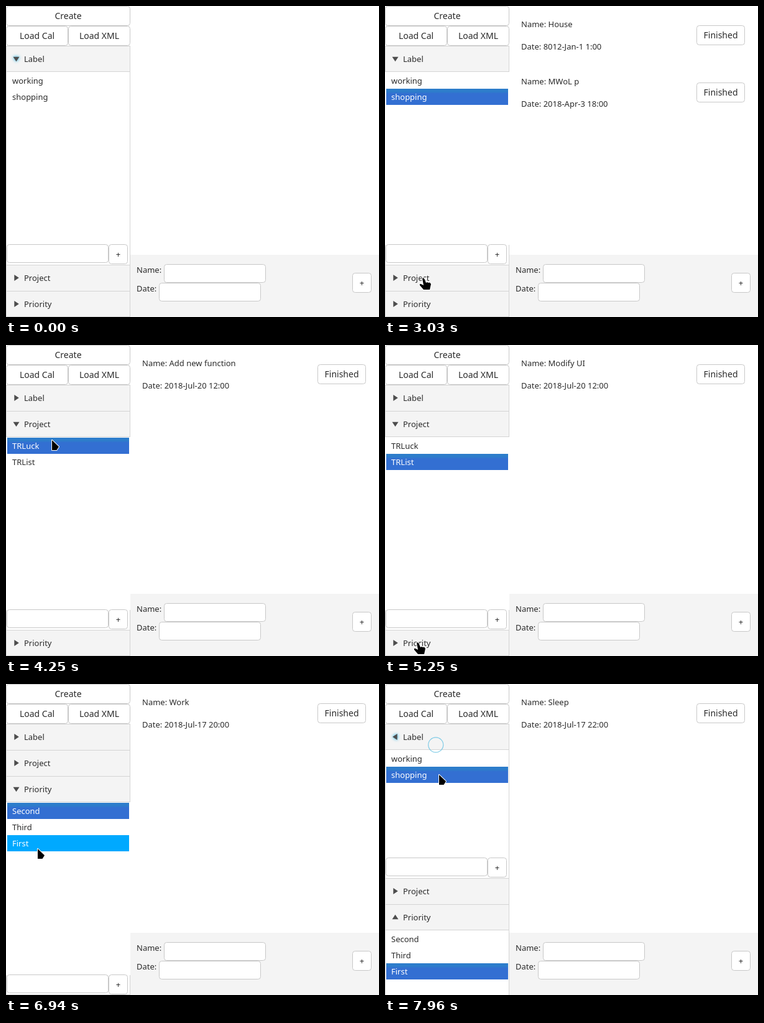
Write an HTML page with a canvas that moves like this. It is 600 px wide and 500 px high and loops after 8000 ms.

```html
<!DOCTYPE html>
<html lang="en">
<head>
<meta charset="utf-8">
<title>Task list</title>
<style>
html, body { margin: 0; width: 100%; height: 100%; overflow: hidden; background: #fff; }
canvas { display: block; }
</style>
</head>
<body>
<canvas id="stage" width="600" height="500"></canvas>
<script>
const ctx = document.getElementById('stage').getContext('2d', { alpha: false });
const LOOP = 8000, SLIDE = 350, MOVE = 350, POINTER_FROM = 2710;
const BODY = 310, HEAD = 42, ROW = 26, TOP = 64;
const INK = '#2b2b2b', LINE = '#c8c8c8', EDGE = '#d4d4d4', PANEL = '#f4f4f4';

const task = (name, date) => ({ name, date });
const row = (name, ...tasks) => ({ name, tasks });
const panes = [
  { title: 'Label', rows: [
    row('working', task('TRLuck', '2018-Jun-20 12:00')),
    row('shopping', task('House', '8012-Jan-1 1:00'), task('MWoL p', '2018-Apr-3 18:00'))] },
  { title: 'Project', rows: [
    row('TRLuck', task('Add new function', '2018-Jul-20 12:00')),
    row('TRList', task('Modify UI', '2018-Jul-20 12:00'))] },
  { title: 'Priority', rows: [
    row('Second', task('Work', '2018-Jul-17 20:00')),
    row('Third'),
    row('First', task('Sleep', '2018-Jul-17 22:00'))] }
];

// The session: the pointer arrives at a point, and a name is clicked
const stops = [{ t: 0, x: 70, y: 250 }], clicks = [];
const go = (t, x, y) => stops.push({ t, x, y });
function click(t, name) {
  const pane = panes.find(p => p.title === name || p.rows.some(r => r.name === name));
  clicks.push({ t, pane, row: pane.rows.find(r => r.name === name) });
}

go(1230, 70, 146);
go(1460, 70, 120);  click(1640, 'working');
go(1840, 70, 146);  click(2190, 'shopping');
go(3030, 59, 437);  click(3360, 'Project');
go(3860, 72, 162);  click(4010, 'TRLuck');
go(4250, 73, 152);
go(4540, 80, 186);  click(4560, 'TRList');
go(5200, 50, 478);  click(5430, 'Priority');
go(5780, 79, 270);
go(6040, 62, 230);  click(6090, 'Third');
go(6400, 50, 204);  click(6440, 'Second');
go(6900, 50, 264);  click(7130, 'First');
go(7620, 80, 79);   click(7740, 'Label');
go(7960, 86, 145);

const arrowShape = new Path2D('M1 1V17H8.5L12 11.5Z');
const handShape = new Path2D('M1 1Q3-1 4.5 2L7 8L9 7L11 8L13 7.5L15 10L13 19H3L-3 12Q-4 9-1 10L3 12Z');

function pointerAt(t) {
  const i = stops.findIndex(s => s.t > t);
  if (i < 0) return stops.at(-1);
  const a = stops[i - 1], b = stops[i];
  const u = Math.max(0, 1 - (b.t - t) / Math.min(MOVE, b.t - a.t));
  const k = u * u * (3 - 2 * u);
  return { x: a.x + (b.x - a.x) * k, y: a.y + (b.y - a.y) * k };
}

// Slow start and end with a straight middle part
function easeBoth(u) {
  if (u >= 1) return 1;
  if (u < .2) return 3.125 * u * u;
  return u < .8 ? 1.25 * u - .125 : 1 - 3.125 * (1 - u) ** 2;
}

function rect(x, y, w, h, fill) {
  ctx.fillStyle = fill;
  ctx.fillRect(x, y, w, h);
}

function text(s, x, y, size = 13, color = INK, align = 'left') {
  ctx.font = size + 'px "Noto Sans", sans-serif';
  ctx.textAlign = align;
  ctx.fillStyle = color;
  ctx.fillText(s, x, y);
}

function box(x, y, w, h) {
  ctx.beginPath();
  ctx.roundRect(x + .5, y + .5, w - 1, h - 1, 4);
  ctx.fillStyle = '#fff';
  ctx.fill();
  ctx.strokeStyle = LINE;
  ctx.lineWidth = 1;
  ctx.stroke();
}

function button(label, x, y, w, h, size = 14) {
  box(x, y, w, h);
  text(label, x + w / 2, y + h / 2 + 5, size, INK, 'center');
}

function sides(y, h) {
  rect(0, y, 1, h, EDGE);
  rect(199, y, 1, h, EDGE);
}

function drawArrow(x, y, angle, glow) {
  ctx.save();
  ctx.translate(x, y);
  ctx.rotate(angle * Math.PI / 180);
  ctx.beginPath();
  ctx.moveTo(-5, -3.2);
  ctx.lineTo(5, -3.2);
  ctx.lineTo(0, 4.3);
  ctx.closePath();
  ctx.fillStyle = '#4d4d4d';
  if (glow) {
    ctx.shadowColor = '#00a8e0';
    ctx.shadowBlur = 5;
  }
  ctx.fill();
  ctx.restore();
}

function drawRow(name, y, selected, hover) {
  if (selected) {
    const g = ctx.createLinearGradient(0, y, 0, y + 8);
    g.addColorStop(.6, '#2d7dcb');
    g.addColorStop(1, '#336fd2');
    rect(2, y, 196, ROW, g);
  } else if (hover) rect(2, y, 196, ROW, '#00a9ff');
  text(name, 10, y + 18, 13, selected || hover ? '#fff' : INK);
}

function drawBody(pane, y, shown, height, listFocused, pointer) {
  ctx.save();
  ctx.beginPath();
  ctx.rect(0, y, 200, shown);
  ctx.clip();
  const listEnd = y + height - 33, side = listFocused ? listEnd + 1 : y;
  sides(side, y + height - side);
  pane.rows.forEach((r, i) => {
    const top = y + 1 + i * ROW;
    const hover = pointer.y >= top && pointer.y < Math.min(top + ROW, y + shown);
    drawRow(r.name, top, r === pane.selected, hover);
  });
  box(1, listEnd, 164, 30);
  button('+', 165, listEnd, 31, 32, 13);
  ctx.restore();
}

// Returns whether the pointer is on a pane header
function drawSidebar(past, t, pointer) {
  const toggles = past.filter(c => !c.row);
  const last = toggles.at(-1) || { t: -SLIDE, pane: panes[0] };
  const from = toggles.length > 1 ? toggles.at(-2).pane : panes[0];
  const k = easeBoth((t - last.t) / SLIDE);
  const listFocused = Boolean(past.at(-1)?.row);
  let y = TOP, onHeader = false;

  button('Create', 0, 0, 200, 32);
  button('Load Cal', 0, 32, 100, 32);
  button('Load XML', 100, 32, 100, 32);
  for (const pane of panes) {
    const opening = pane === last.pane;
    const part = opening ? k : pane === from ? 1 - k : 0;
    const shown = Math.round(BODY * part);
    rect(0, y, 200, HEAD, PANEL);
    rect(0, y, 200, 1, EDGE);
    sides(y, HEAD);
    if (shown) {
      rect(0, y + HEAD - 1, 200, 1, EDGE);
      drawBody(pane, y + HEAD, shown, opening ? shown : BODY, listFocused, pointer);
    }
    drawArrow(16.5, y + 21, 270 * (1 - part), opening && !listFocused);
    text(pane.title, 29, y + 26);
    onHeader ||= pointer.y >= y && pointer.y < y + HEAD;
    y += HEAD + shown;
  }
  if (k === 1) rect(0, 499, 200, 1, EDGE);
  return onHeader;
}

function drawTasks(tasks) {
  tasks.forEach(({ name, date }, i) => {
    const y = i * 92;
    text('Name: ' + name, 219, y + 34);
    text('Date: ' + date, 219, y + 70);
    button('Finished', 501, y + 31, 78, 32);
  });
}

function drawForm() {
  rect(200, 400, 400, 100, PANEL);
  text('Name:', 210, 429);
  box(254, 415, 164, 30);
  text('Date:', 210, 459);
  box(246, 445, 164, 30);
  button('+', 557, 429, 31, 32, 13);
}

function drawPointer({ x, y }, shape) {
  ctx.save();
  ctx.translate(Math.round(x), Math.round(y));
  ctx.lineJoin = 'round';
  ctx.lineWidth = 2;
  ctx.strokeStyle = '#fff';
  ctx.stroke(shape);
  ctx.fillStyle = '#000';
  ctx.fill(shape);
  ctx.restore();
}

function drawRing(start, t) {
  const age = t - start;
  if (age >= 240) return;
  const { x, y } = pointerAt(start);
  ctx.beginPath();
  ctx.arc(x, y, age * 12 / 220, 0, 2 * Math.PI);
  ctx.strokeStyle = '#7fcbe6';
  ctx.lineWidth = 1.2;
  ctx.stroke();
}

function draw(t) {
  const past = clicks.filter(c => c.t <= t);
  const picks = past.filter(c => c.row);
  const pointer = pointerAt(t);
  for (const pane of panes) pane.selected = picks.findLast(c => c.pane === pane)?.row;

  rect(0, 0, 600, 500, '#fff');
  const onHeader = drawSidebar(past, t, pointer);
  drawTasks(picks.at(-1)?.row.tasks ?? []);
  drawForm();
  if (past.length > 1) drawRing(past.at(-1).t, t);
  if (t >= POINTER_FROM) drawPointer(pointer, onHeader ? handShape : arrowShape);
}

const start = performance.now();
function frame() {
  draw((performance.now() - start) % LOOP);
  requestAnimationFrame(frame);
}
frame();
</script>
</body>
</html>
```
